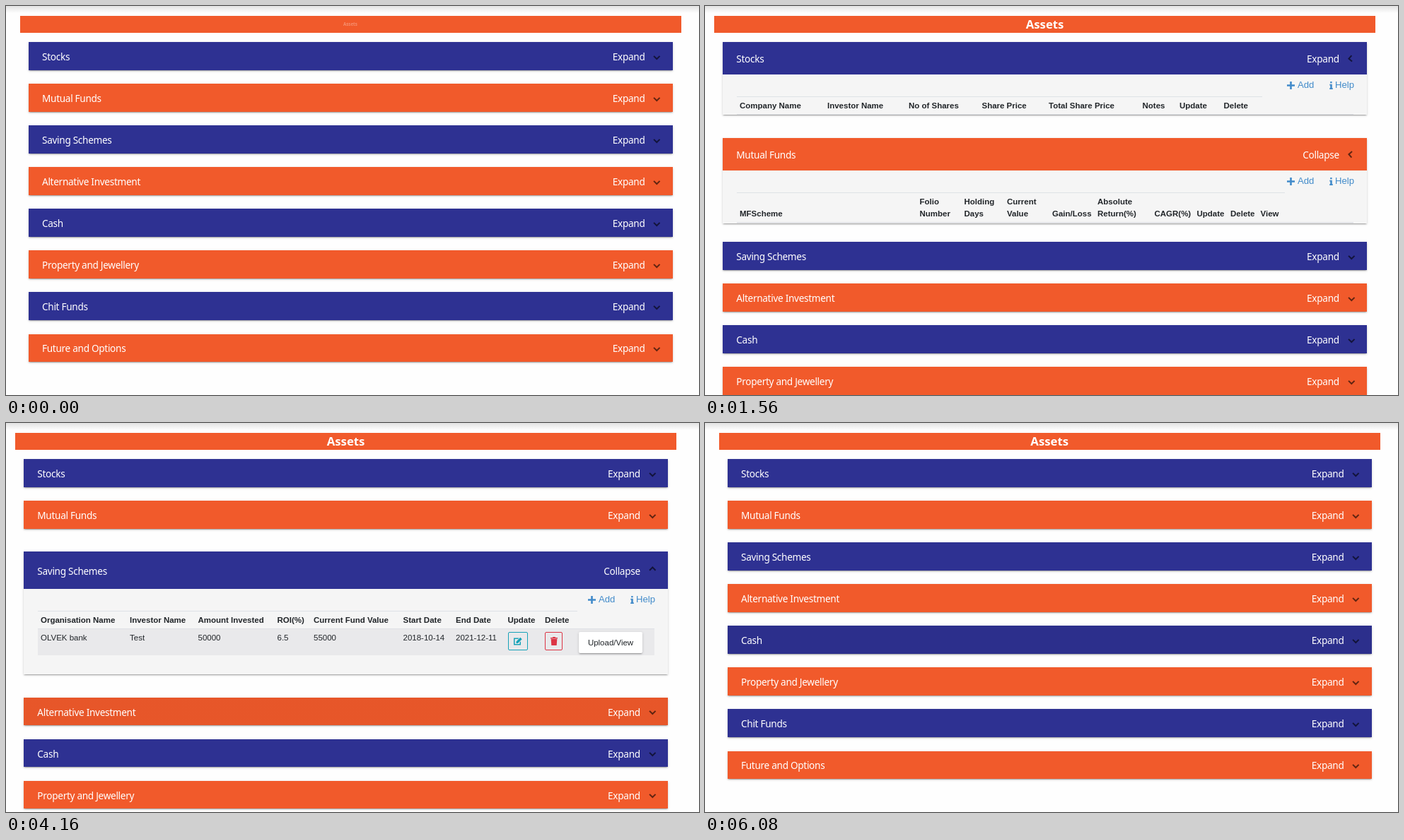
An HTML page that plays this animation: 980 by 551 pixels, repeating every 6.44 s.

```html
<!DOCTYPE html>
<html lang="en">
<head>
<meta charset="utf-8">
<title>Assets</title>
<style>
  html, body { margin: 0; width: 100%; height: 100%; overflow: hidden; background: #fefefe; }
  #stage {
    position: relative; width: 980px; height: 551px; overflow: hidden; background: #fefefe;
    font: 11.49px/16.4px "Liberation Sans", Arial, sans-serif; color: #212529;
  }
  #stage::before {
    content: ""; position: absolute; inset: 0 0 auto; height: 10px;
    background: linear-gradient(#e2e2e2, #fefefe);
  }
  #page { position: absolute; inset: 0; }
  #bar {
    position: absolute; left: 19.5px; top: 14px; width: 935.5px; height: 24px; background: #f15a2b;
    color: #fff; text-align: center; font: bold 16.8px/24px "Noto Sans", "Open Sans", sans-serif;
  }
  #title { display: inline-block; }
  /* flex keeps neighbouring panel margins from collapsing */
  #list { position: absolute; left: 32px; top: 51.2px; width: 911px; display: flex; flex-direction: column; }
  .panel {
    --p: 0; margin: calc(13.1px * var(--p)) 0 calc(19.67px + 13.1px * var(--p));
    background: #f5f5f5;
    box-shadow: 0 2.4px .8px -1.6px rgba(0,0,0,.2), 0 1.6px 1.6px rgba(0,0,0,.14), 0 .8px 4px rgba(0,0,0,.12);
  }
  .panel:first-child { margin-top: 0; }
  .head {
    position: relative; display: flex; align-items: center; justify-content: space-between;
    height: calc(39.4px + 13.1px * var(--p)); box-sizing: border-box; padding: 1px 39.5px 0 19px;
    background: #2e3192; color: #fff; letter-spacing: -.3px;
    font: 500 13.6px "Noto Sans", "Open Sans", sans-serif;
  }
  .panel:nth-child(even) .head { background-color: #f15a2b; }
  .hover .head { background-image: linear-gradient(rgba(0,0,0,.045), rgba(0,0,0,.045)); }
  .head i {
    position: absolute; left: 885.2px; top: calc(50% - 3.3px); width: 6.6px; height: 6.6px;
    box-sizing: border-box; border: solid rgba(0,0,0,.6); border-width: 0 2px 2px 0;
    transform: rotate(calc(45deg + 180deg * var(--p)));
  }
  .body { position: relative; height: calc(var(--h) * var(--p)); overflow: hidden; }
  /* table contents are laid out in scrolled-page coordinates */
  .sheet { position: absolute; left: -25.3px; top: 0; width: 980px; }
  .sheet > *, .row > * { position: absolute; white-space: pre; }
  .link { top: 7px; font-size: 13.13px; color: #428bca; }
  .sheet svg { fill: currentColor; }
  .rule { left: 45px; top: 31px; height: 1px; background: #dee2e6; }
  .row { left: 45px; width: 872px; box-sizing: border-box; border-top: 1px solid #dfe1e6; }
  .odd { background: #e9e9eb; }
  .row.lit { background: #dededf; }
  .cell { top: 4px; }
  .icon { top: 4px; height: 26px; box-sizing: border-box; border: 1px solid; border-radius: 2px; }
  .icon svg { position: absolute; left: 50%; top: 50%; transform: translate(-50%, -50%); }
  .edit { width: 28px; color: #17a2b8; }
  .bin { width: 25px; color: #dc3545; }
  .upload {
    top: 4px; width: 90px; height: 30px; line-height: 30px; text-align: center; background: #fff; border-radius: 2px;
    box-shadow: 0 2.4px .8px -1.6px rgba(0,0,0,.2), 0 1.6px 1.6px rgba(0,0,0,.14), 0 .8px 4px rgba(0,0,0,.12);
  }
</style>
</head>
<body>
<div id="stage"><div id="page">
  <div id="bar"><span id="title">Assets</span></div>
  <div id="list"></div>
</div></div>
<script>
const LOOP = 6440, STEP = 40, OPEN_MS = 225;

// open: [start, end] of the expanded state; hover: darker header intervals
// cols: [heading, x]; end: right end of the heading rule
const panels = [
  { name: 'Stocks', open: [819, 1479], hover: [[480, 819]], end: 788,
    cols: [['Company Name', 49], ['Investor Name', 173], ['No of Shares', 288], ['Share Price', 391.5],
      ['Total Share Price', 486], ['Notes', 618.5], ['Update', 671], ['Delete', 733.5]],
    rows: [['Company', 'Test', '100', '250', '25000']] },
  { name: 'Mutual Funds', open: [1479, 2270], hover: [[240, 480], [1160, 1479]], end: 820,
    rowHeight: 42, lit: 1960,
    cols: [['MFScheme', 49], ['Folio\nNumber', 303.5], ['Holding\nDays', 366.5], ['Current\nValue', 427],
      ['Gain/Loss', 491], ['Absolute\nReturn(%)', 555], ['CAGR(%)', 635.5], ['Update', 695.5],
      ['Delete', 743], ['View', 785.5]],
    rows: [['Growth Fund', '10001', '365', '55000', '5000', '10', '10']] },
  { name: 'Saving Schemes', open: [2270, 4200], hover: [[2200, 2270]], end: 808,
    cols: [['Organisation Name', 49], ['Investor Name', 175], ['Amount Invested', 271.5], ['ROI(%)', 383.5],
      ['Current Fund Value', 435], ['Start Date', 561.5], ['End Date', 636], ['Update', 709.5], ['Delete', 762]],
    rows: [['OLVEK bank', 'Test', '50000', '6.5', '55000', '2018-10-14', '2021-12-11']] },
  { name: 'Alternative Investment', open: [4200, 4960], hover: [[2840, 4200]], end: 746,
    cols: [['Investor Name', 49], ['Amount Invested', 200.5], ['Current Market Value', 376.5],
      ['Update', 591], ['Delete', 673]],
    rows: [['Test', '50000', '60000']] },
  { name: 'Cash', open: [4960, 5825], hover: [[4480, 4960], [5825, LOOP]], end: 803,
    cols: [['Cash Source', 49], ['Bank Name', 183], ['Account Number', 265], ['Account Type', 381],
      ['Amount', 477.5], ['Intrest Rate', 538], ['Hand Loan', 621], ['Update', 700], ['Delete', 755]],
    rows: [['Bank', 'OLVEK Bank', '5656756', 'Saving', '230000'],
      ['Personal Possession', '', '', '', '50000'],
      ['Hand Loan', '', '', '', '30000', '10', 'Kiran'],
      ['Other Source', '', '', '', '25000']] },
  { name: 'Property and Jewellery' },
  { name: 'Chit Funds' },
  { name: 'Future and Options' },
];

const svg = (w, h, path) => `<svg width="${w}" height="${h}" viewBox="0 0 ${w} ${h}"><path fill-rule="evenodd" d="${path}"/></svg>`;
const plus = svg(11, 11, 'M4.2 0h2.6v4.2H11v2.6H6.8V11H4.2V6.8H0V4.2h4.2z');
const info = svg(5, 11, 'M1.2 0h2.4v2.3H1.2zM.3 3.7h3.5v5.5h1V11H.2V9.2h1V5.5H.3z');
const pencil = svg(13, 12, 'M.5 1.5H8L6.6 3H2v7h7V7.8l1.5-1.5v5.2H.5zM4 6.6 9.8.8 12.2 3.2 6.4 9H4z');
const trash = svg(10, 12, 'M3.4 0h3.2l.6.9H10v1.5H0V.9h2.8zM.7 3h8.6l-.6 9H1.3z');

const box = (cls, left, html, style = '') => `<div class="${cls}" style="left:${left}px;${style}">${html}</div>`;

function rowHtml(panel, row, index, top) {
  const cells = panel.cols.map(([name, x], c) => {
    const left = x - 45;
    if (name === 'Update') return box('icon edit', left, pencil);
    if (name === 'Delete') return box('icon bin', left, trash);
    return box('cell', left, row[c] || '');
  });
  const style = `top:${top}px;height:${panel.rowHeight}px`;
  return box('row' + (index % 2 ? '' : ' odd'), 45, cells.join('') + box('upload', panel.end - 43, 'Upload/View'), style);
}

function sheetHtml(panel) {
  const lines = panel.cols.some(([name]) => name.includes('\n')) ? 2 : 1;
  const headEnd = 31.5 + 8.6 + 16.4 * lines;
  panel.rowHeight ||= 38.1;
  panel.height = headEnd + panel.rowHeight * panel.rows.length + 26.6;
  const heads = panel.cols.map(([name, x]) => {
    const top = headEnd - 4.3 - 16.4 * name.split('\n').length;
    return box('', x, name, `top:${top}px;font-weight:bold`);
  });
  const rows = panel.rows.map((row, i) => rowHtml(panel, row, i, headEnd + i * panel.rowHeight));
  return box('link', 823, plus, 'top:9px') + box('link', 838, 'Add')
    + box('link', 883, info, 'top:9px') + box('link', 891, 'Help')
    + box('rule', 45, '', `width:${panel.end - 45}px`) + heads.join('') + rows.join('');
}

const page = document.getElementById('page');
const title = document.getElementById('title');
const list = document.getElementById('list');

for (const panel of panels) {
  const el = panel.el = document.createElement('div');
  el.className = 'panel';
  const sheet = panel.cols ? sheetHtml(panel) : '';
  el.innerHTML = `<div class="head"><span>${panel.name}</span><span class="label">Expand</span><i></i></div>`
    + (sheet && `<div class="body"><div class="sheet">${sheet}</div></div>`);
  el.style.setProperty('--h', (panel.height || 0) + 'px');
  panel.label = el.querySelector('.label');
  panel.row = el.querySelector('.row');
  list.append(el);
}

function bezier(x1, y1, x2, y2) {
  const at = (a, b, s) => 3 * (1 - s) * (1 - s) * s * a + 3 * (1 - s) * s * s * b + s * s * s;
  return x => {
    if (x <= 0) return 0;
    if (x >= 1) return 1;
    let lo = 0, hi = 1;
    for (let i = 0; i < 24; i++) {
      const mid = (lo + hi) / 2;
      if (at(x1, x2, mid) < x) lo = mid; else hi = mid;
    }
    return at(y1, y2, lo);
  };
}
const ease = bezier(.25, .1, .25, 1);
const standard = bezier(.4, 0, .2, 1);

function draw(t) {
  const zoom = (t + 105) / 1000;
  title.style.transform = `scale(${.3 + .7 * ease(zoom)})`;
  title.style.opacity = ease(zoom * 2);

  let growth = 0;
  for (const panel of panels) {
    if (!panel.cols) continue;
    const [start, end] = panel.open;
    const p = standard((t - start) / OPEN_MS) - standard((t - end) / OPEN_MS);
    growth += p * (panel.height + (panel === panels[0] ? 26.2 : 39.3));
    panel.el.style.setProperty('--p', p);
    panel.el.classList.toggle('hover', panel.hover.some(([a, b]) => t >= a && t < b));
    panel.label.textContent = t >= start && t < end ? 'Collapse' : 'Expand';
    if (panel.lit) panel.row.classList.toggle('lit', t >= panel.lit && t < end);
  }
  // the page moves left to make room for a scrollbar once it overflows
  page.style.left = growth > 47 ? '-6.7px' : '0';
}

const origin = performance.now();
function tick() {
  const t = (performance.now() - origin) % LOOP;
  draw(Math.floor(t / STEP) * STEP);
  requestAnimationFrame(tick);
}
tick();
</script>
</body>
</html>
```
